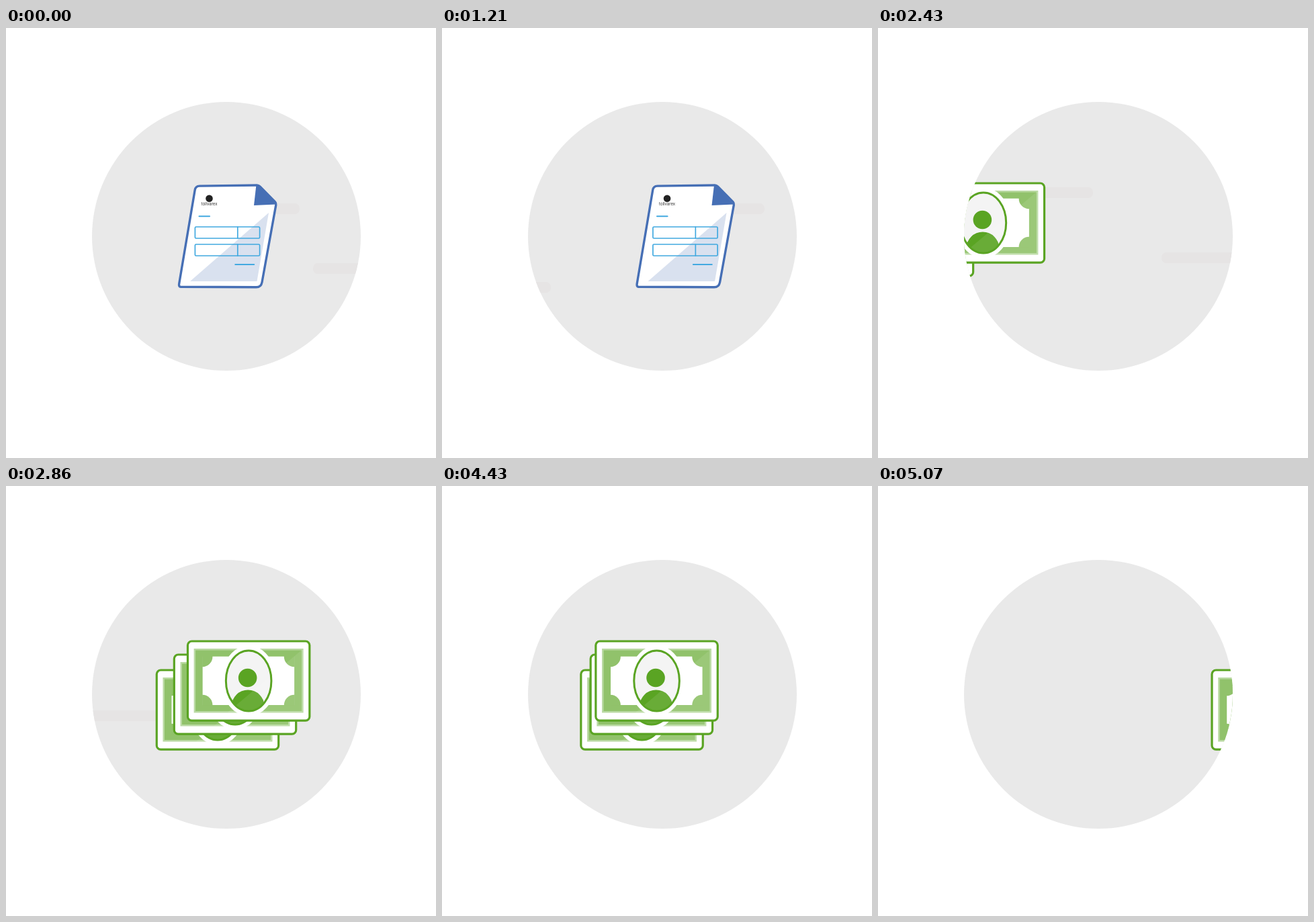
An HTML page with a canvas for the animation above (5.14 s loop, 640 by 640 pixels).

```html
<!DOCTYPE html>
<html lang="en">
<head>
<meta charset="utf-8">
<title>Invoice to cash</title>
<style>
html, body { margin: 0; width: 100%; height: 100%; overflow: hidden; background: #fff; }
canvas { display: block; width: 640px; height: 640px; }
</style>
</head>
<body>
<canvas id="stage"></canvas>
<script>
const LOOP = 5140, FPS = 14;
const BLUE = '#466fb5', SKY = '#42a9e0', GREEN = '#5aa423';
const canvas = document.getElementById('stage');
const ctx = canvas.getContext('2d');
const ratio = window.devicePixelRatio || 1;
canvas.width = canvas.height = 640 * ratio;

const ease = {
  sine: p => (1 - Math.cos(Math.PI * p)) / 2,
  cubic: p => p < 0.5 ? 4 * p ** 3 : 1 - 4 * (1 - p) ** 3,
  out: p => 1 - (1 - p) ** 3,
  accel: p => p ** 2.2
};

// Keys are [time, value, easing towards this key].
function track(keys, t) {
  if (t <= keys[0][0]) return keys[0][1];
  for (let i = 1; i < keys.length; i++) {
    const [t0, v0] = keys[i - 1], [t1, v1, fn] = keys[i];
    if (t <= t1) return v0 + (v1 - v0) * ease[fn]((t - t0) / (t1 - t0));
  }
  return keys[keys.length - 1][1];
}

const docKeys = [
  [-380, 33.5], [380, -33.5, 'sine'], [1140, 33.5, 'sine'],
  [1720, -80, 'cubic'], [2240, 300, 'accel']
];

const billKeys = (enter, leave) => [
  [enter, -335], [enter + 405, 14, 'out'], [enter + 695, -9.5, 'sine'],
  [enter + 985, 0, 'sine'], [leave, 0, 'sine'],
  [leave + 425, -33.5, 'sine'], [leave + 765, 369, 'accel']
];

// Back to front.
const bills = [
  { x: -51, y: 43, keys: billKeys(2445, 4340) },
  { x: -23.5, y: 20, keys: billKeys(2405, 4217) },
  { x: 0, y: 0, keys: billKeys(2365, 4052) }
];

// Wind streaks: y, right end, time at which it is there.
const streaks = [
  [261, 437, 0], [350, 572, 0],
  [261, 483, 1210], [378, 165, 1210],
  [227, 327, 1710], [371, 382, 1710],
  [237, 319, 2430], [334, 536, 2430]
];
const STREAK_LEN = 115, STREAK_SPEED = 0.7;

function paint(fill, stroke, width) {
  if (fill) { ctx.fillStyle = fill; ctx.fill(); }
  if (stroke) { ctx.strokeStyle = stroke; ctx.lineWidth = width; ctx.stroke(); }
}

function box(x, y, w, h, r, fill, stroke, width) {
  ctx.beginPath();
  ctx.roundRect(x, y, w, h, r);
  paint(fill, stroke, width);
}

function oval(x, y, rx, ry, fill, stroke, width) {
  ctx.beginPath();
  ctx.ellipse(x, y, rx, ry, 0, 0, Math.PI * 2);
  paint(fill, stroke, width);
}

function shape(points, fill) {
  ctx.beginPath();
  points.forEach(([x, y]) => ctx.lineTo(x, y));
  ctx.closePath();
  paint(fill);
}

function line(x0, y0, x1, y1, width) {
  ctx.beginPath();
  ctx.moveTo(x0, y0);
  ctx.lineTo(x1, y1);
  paint(null, SKY, width);
}

const sheet = new Path2D('M257.6 381 L281.2 241 Q282.2 235.2 288 235.1 L373.5 234 ' +
  'Q376 234 378 236 L400.6 259 Q402.3 260.8 401.8 263.3 L381 378.5 ' +
  'Q379.6 385.8 372.5 385.8 L260 385.2 Q257 385 257.6 381 Z');

function drawDoc(dx) {
  ctx.save();
  ctx.translate(dx, 0);
  ctx.lineJoin = ctx.lineCap = 'round';
  ctx.fillStyle = '#fff';
  ctx.fill(sheet);
  shape([[391, 275], [373.5, 377], [274, 377]], '#d9e1ef');
  ctx.strokeStyle = BLUE;
  ctx.lineWidth = 3.4;
  ctx.stroke(sheet);
  shape([[372.3, 235], [369, 264], [402, 262.5], [376, 235]], BLUE);

  for (const y of [296, 322]) {
    box(281.4, y, 96.2, 17, 1.5, null, SKY, 1.7);
    line(344.8, y, 344.8, y + 17, 1.7);
  }
  line(287.5, 280.3, 303, 280.3, 2.1);
  line(341.3, 352, 369.2, 352, 2.1);

  oval(302.5, 253.8, 5.3, 5.3, '#222');
  ctx.fillStyle = '#333';
  ctx.font = '6px Inter, Arial, sans-serif';
  ctx.textAlign = 'center';
  ctx.fillText('tollvarex', 302.5, 264.3);
  ctx.restore();
}

function drawBill(dx, dy) {
  ctx.save();
  ctx.translate(dx, dy);
  box(261.3, 231, 181.4, 118.2, 6, '#fff', GREEN, 3.2);

  box(270.5, 242, 163, 95.5, 0, '#b9d9a2');
  box(273, 244.5, 158, 90.5, 0, '#91c26b');
  box(283.5, 253.7, 136.5, 72.3, 0, '#fff');
  ctx.save();
  ctx.beginPath();
  ctx.rect(283, 253, 137.5, 73.5);
  ctx.clip();
  for (const x of [283, 420]) {
    for (const y of [254, 326]) oval(x, y, 15.3, 15.3, '#91c26b');
  }
  ctx.restore();

  oval(352, 290, 41, 52.5, '#fff');
  oval(352, 290, 33.8, 45, '#f4f4f4');
  ctx.save();
  ctx.clip();
  oval(350.5, 285.5, 13.8, 13.8, GREEN);
  oval(351, 328, 24.5, 24.5, GREEN);
  ctx.restore();
  shape([[433.5, 242], [433.5, 337.5], [320, 337.5]], 'rgba(255,255,255,0.09)');
  oval(352, 290, 33.8, 45, null, GREEN, 3);
  ctx.restore();
}

function draw(t) {
  ctx.setTransform(ratio, 0, 0, ratio, 0, 0);
  ctx.fillStyle = '#fff';
  ctx.fillRect(0, 0, 640, 640);
  oval(328, 310, 200, 200, '#e9e9e9');
  ctx.save();
  ctx.clip();

  if (t < 3050) {
    for (const [y, x, at] of streaks) {
      const right = x - STREAK_SPEED * (t - at);
      box(right - STREAK_LEN, y, STREAK_LEN, 16, 7, '#e6e4e4');
    }
  }
  if (t < 2240) drawDoc(track(docKeys, t));
  if (t > 2300) {
    for (const b of bills) drawBill(b.x + track(b.keys, t), b.y);
  }
  ctx.restore();
}

const start = performance.now();
function tick() {
  const t = (performance.now() - start) % LOOP;
  // The motion advances in even steps.
  draw(Math.floor(t * FPS / 1000 + 0.05) * 1000 / FPS);
  requestAnimationFrame(tick);
}
tick();
</script>
</body>
</html>
```
